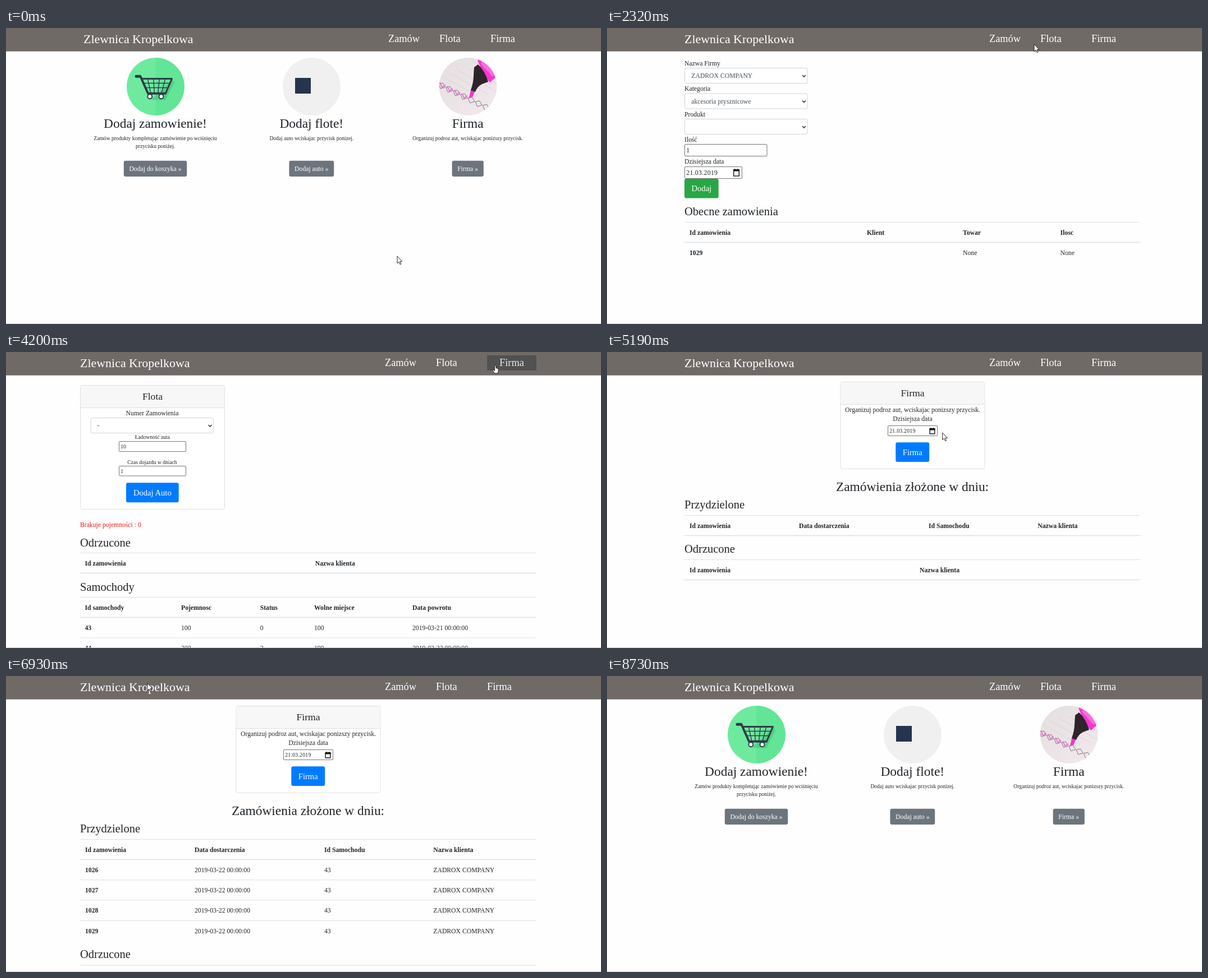
An HTML page that plays this animation: 1060x528 px, repeating every 9890 ms.

```html
<!DOCTYPE html>
<html lang="pl">
<head>
<meta charset="utf-8">
<title>Zlewnica Kropelkowa</title>
<style>
  html, body { margin: 0; width: 100%; height: 100%; overflow: hidden; background: #fefefe; }
  svg { display: block; width: 100%; height: 100%; }
  text { font-family: "Liberation Serif", "Times New Roman", serif; white-space: pre; }
</style>
</head>
<body>
<svg id="stage" viewBox="0 0 1060 528"></svg>
<script>
const LOOP = 9890;
const INK = '#212529', BODY = 11.7, SMALL = 9.55, H2 = 23.4, H3 = 20.5, LARGE = 14.6;
const BRAND = 'Zlewnica Kropelkowa', CLIENT = 'ZADROX COMPANY';

// Drawing helpers
const text = (x, y, s, size = BODY, extra = '', fill = INK) =>
  `<text x="${x}" y="${y}" font-size="${size}" fill="${fill}" ${extra}>${s}</text>`;
const mid = (x, y, s, size, fill) => text(x, y, s, size, 'text-anchor="middle"', fill);
const bold = (x, y, s) => text(x, y, s, BODY, 'font-weight="700"');
const box = (x, y, x2, y2, fill, extra = '') =>
  `<rect x="${x}" y="${y}" width="${x2 - x}" height="${y2 - y}" fill="${fill}" ${extra}/>`;
const path = (d, extra) => `<path d="${d}" ${extra}/>`;
const line = (d, width, color) =>
  path(d, `fill="none" stroke="${color}" stroke-width="${width}" stroke-linejoin="round" stroke-linecap="round"`);
const disc = (x, y, r, fill, extra = '') => `<circle cx="${x}" cy="${y}" r="${r}" fill="${fill}" ${extra}/>`;
const rule = (x, y, h = 1) => box(x, y, x + 812.5, y + h, '#dee2e6');
const group = (id, body, extra = '') => `<g id="${id}" ${extra}>${body}</g>`;
const frame = (x, y, x2, y2, stroke, r) =>
  box(x + .5, y + .5, x2 - .5, y2 - .5, '#fff', `stroke="${stroke}" rx="${r}"`);
const button = (x, y, x2, y2, fill, label, base, size, id = '') =>
  box(x, y, x2, y2, fill, `rx="3.2" ${id && `id="${id}"`}`) + mid((x + x2) / 2, base, label, size, '#fff');
const select = (x, y, value) => frame(x, y, x + 219.5, y + 28, '#ced4da', 3) +
  text(x + 12.3, y + 18, value, BODY, '', '#495057') +
  path(`M${x + 210} ${y + 13}l3 3l3 -3`, 'fill="none" stroke="#343a40" stroke-width="1.6"');
const input = (x, y, x2, y2, value, size = BODY, spacing = 0) => frame(x, y, x2, y2, '#767676', 1.5) +
  text(x + 3.2, y + (y2 - y) / 2 + size * .34, value, size, `letter-spacing="${spacing}"`);
const calendar = (x, y, w, h) => box(x + .7, y + 2, x + w - .7, y + h, 'none', 'stroke="#111" stroke-width="1.4"') +
  box(x, y + 1.3, x + w, y + 4.5, '#111') + box(x + 2, y, x + 3.4, y + 2, '#111') +
  box(x + w - 3.4, y, x + w - 2, y + 2, '#111');

function table(x, y, cols, head, rows) {
  let out = rule(x, y) + rule(x, y + 35.6, 1.6);
  cols.forEach((c, i) => out += bold(c, y + 22.5, head[i]));
  rows.forEach((row, r) => {
    const base = y + 58.8 + r * 36.3;
    if (r) out += rule(x, base - 22.8);
    row.forEach((cell, i) => out += (i ? text : bold)(cols[i], base, cell));
  });
  return out;
}

const card = (x, y, title, y2) => frame(x, y, x + 258, y2, '#dfdfdf', 3) +
  box(x + 1, y + 1, x + 257, y + 40, '#f7f7f7') + box(x, y + 40, x + 258, y + 41, '#dfdfdf') +
  mid(x + 129, y + 26, title, 17.6);

// Round pictures
function cart() {
  const dark = '#2f3b47';
  let grid = 'M245 98.5H291M249 106.5H288';
  for (let i = 1; i < 5; i++) grid += `M${242 + i * 10.4} 91L${251 + i * 6.6} 115`;
  const wheel = x => disc(x, 122.3, 4, '#fff', `stroke="${dark}" stroke-width="2"`);
  return disc(266.4, 104.5, 51.4, '#6eea9f') +
    path('M266.4 53.1a51.4 51.4 0 0 1 0 102.8z', 'fill="#62e596"') +
    path('M258 128L297 92L300 97L284 129Z', 'fill="#43bd78" opacity=".55"') +
    line(grid, 1.4, dark) + line('M242 90.5H295.5L284.5 116.5', 3, dark) +
    line('M232 86.3H239.5L253 116.8H284', 4, dark) + line('M232 86.3H238.5', 5, dark) +
    wheel(256.3) + wheel(276.5);
}

const fleet = () => disc(544.5, 104.5, 51.4, '#f0f0f0') + box(515, 89, 543, 117, '#26344f');

function marker() {
  let out = box(771, 53, 875, 156, 'url(#paper)');
  for (let i = 0; i < 7; i++) out += line(`M${755 + i * 17} ${88 - i * 4}l70 38`, .8, '#d9d0d3');
  for (let i = 0; i < 7; i++) {
    const x = 776 + i * 13.1, y = 103 + i * 6.4;
    out += line(`M${x - 5} ${y - 3.5}l7 -1.5l4.5 7.5l-8 2.5z`, 1, '#85757f');
    if (i < 4) out += line(`M${x - 3} ${y - 5}l4 8l5 -4`, 1.7, '#f268d6');
  }
  out += path('M840 57L849 51H876V85L862 97L851 85Z', 'fill="#fb35d2"') +
    path('M849 58L872 82L867 87L846 64Z', 'fill="#fd6cdf"') +
    path('M834 70L841 65Q853 76 859 96L848 100Q839 105 836 114L827.5 112Q833 97 833 85Z', 'fill="#2d2529"') +
    path('M828 111L835 113.5L831 123L825 124.5Z', 'fill="#f235c4"');
  return `<g clip-path="url(#round)">${out}</g>`;
}

// Pages
const grey = (x, x2, label, id) => button(x, 236.8, x2, 265, '#6c757d', label, 255, BODY, id);
const home = () => group('cart', cart()) + group('fleet', fleet()) +
  group('marker', marker(), 'clip-path="url(#load)"') +
  mid(266, 178, 'Dodaj zamowienie!', H2) + mid(544.3, 178, 'Dodaj flote!', H2) + mid(822.7, 178, 'Firma', H2) +
  mid(266, 200, 'Zamów produkty kompletując zamówienie po wciśnięciu', SMALL) +
  mid(266, 214, 'przycisku poniżej.', SMALL) +
  mid(544.3, 200, 'Dodaj auto wciskajac przycisk ponizej.', SMALL) +
  mid(822.7, 200, 'Organizuj podroz aut, wciskajac ponizszy przycisk.', SMALL) +
  box(208.7, 235.5, 323.5, 266.3, 'none', 'id="greyRing" rx="4.4" stroke="#b5babe" stroke-width="2.6"') +
  grey(209.8, 322.2, 'Dodaj do koszyka »', 'addOrder') + grey(504.4, 584.2, 'Dodaj auto »') +
  grey(794.6, 850.8, 'Firma »');

const orders = () => text(138, 66.5, 'Nazwa Firmy') + select(138, 71, CLIENT) +
  text(138, 112, 'Kategoria') + select(138, 116.5, 'akcesoria prysznicowe') +
  text(138, 157.5, 'Produkt') + select(138, 162, '') +
  text(138, 203, 'Ilość') + input(138, 207, 285.5, 229, '1') +
  text(138, 242, 'Dzisiejsza data') + input(138, 247, 241, 269, '21.03.2019', BODY, .35) + calendar(225, 251, 11, 13) +
  button(138, 269, 198.7, 303.5, '#28a745', 'Dodaj', 291, LARGE) +
  text(138, 334, 'Obecne zamowienia', H3) +
  table(138, 346, [147, 463, 634, 807.5], ['Id zamowienia', 'Klient', 'Towar', 'Ilosc'], [['1029', '', 'None', 'None']]);

const cars = () => card(132, 59, 'Flota', 281) +
  mid(260.5, 112.5, 'Numer Zamowienia', BODY) + select(150.5, 117, '-') +
  mid(260.8, 155, 'Ładowność auta', SMALL) + input(201, 159, 321, 178, '10', 9.75) +
  mid(260.5, 199.5, 'Czas dojazdu w dniach', SMALL) + input(201, 203, 321, 221.5, '1', 9.75) +
  button(214, 233.3, 307.7, 268.3, '#007bff', 'Dodaj Auto', 255.8, LARGE) +
  text(132, 311.7, 'Brakuje pojemności : 0', BODY, '', '#f01a10') +
  text(132, 346.5, 'Odrzucone', H3) +
  table(132, 358, [140.5, 550.7], ['Id zamowienia', 'Nazwa klienta'], []) +
  text(132, 425.5, 'Samochody', H3) +
  table(132, 437, [140.5, 312, 452.7, 549, 724],
    ['Id samochody', 'Pojemnosc', 'Status', 'Wolne miejsce', 'Data powrotu'],
    [['43', '100', '0', '100', '2019-03-21 00:00:00'], ['44', '200', '2', '199', '2019-03-23 00:00:00']]);

function company(rows, ring, send) {
  const dy = rows.length * 36.3;
  return card(415.5, 53, 'Firma', 209) +
    mid(544.5, 107, 'Organizuj podroz aut, wciskajac ponizszy przycisk.', BODY) +
    mid(544.5, 122.7, 'Dzisiejsza data', BODY) +
    input(500, 131, 589, 150, '21.03.2019', 9.75, .25) + calendar(574.5, 135, 10, 11) + ring +
    button(514.3, 161.2, 574.2, 196, '#007bff', 'Firma', 183.8, LARGE, send) +
    mid(544, 248, 'Zamówienia złożone w dniu:', H2) +
    text(138, 279, 'Przydzielone', H3) +
    table(138, 291, [147, 342, 573, 767.3], ['Id zamowienia', 'Data dostarczenia', 'Id Samochodu', 'Nazwa klienta'], rows) +
    text(138, 358 + dy, 'Odrzucone', H3) +
    table(138, 370 + dy, [147, 557], ['Id zamowienia', 'Nazwa klienta'], []);
}
const blueRing = box(513, 160, 575.5, 197, 'none', 'id="blueRing" rx="4.5" stroke="#80bdff" stroke-width="2.6"');
const assigned = [1026, 1027, 1028, 1029].map(n => [n, '2019-03-22 00:00:00', 43, CLIENT]);

const nav = () => text(138, 26.5, BRAND, 21.95, '', '#fff') + text(681, 25, 'Zamów', 18.35, '', '#fff') +
  ['Flota', 'Firma'].map(s => box(0, 6, 1, 33, '#515151', `id="bg${s}"`) +
    text(0, 25, s, 18.35, `id="tx${s}"`, '#fff')).join('');

const stage = document.getElementById('stage');
stage.innerHTML = `<defs>
  <linearGradient id="paper" x2="1" y2="1"><stop stop-color="#e3dfe0"/><stop offset="1" stop-color="#f3e9ec"/></linearGradient>
  <clipPath id="round"><circle cx="823" cy="104.5" r="51.4"/></clipPath>
  <clipPath id="load"><rect id="loaded" x="770" y="50" width="110" height="110"/></clipPath></defs>` +
  box(0, 0, 1060, 528, '#fefefe') + box(0, 0, 1060, 41.7, '#706a67') +
  group('nav', nav()) + group('home', home()) + group('orders', orders()) + group('cars', cars()) +
  group('company', company([], blueRing, 'send')) +
  group('tall', company(assigned, ''), 'transform="translate(-6)"') +
  box(0, 527, 1060, 528, '#c9c9c9') +
  group('cursor',
    path('M0 0V12.8L3 10.2L5 14.8L6.9 14L5 9.4H8.8Z', 'id="arrow"') +
    path('M-1.4 8V1Q-1.4 0 -.2 0Q1 0 1 1V4.6L4 5.2Q5.4 5.6 5.3 7L5 10.4L4.2 14H-1.6L-4.7 9.4Q-4.8 7.6 -3.3 8L-1.4 9.6Z', 'id="hand"'),
    'fill="#fff" stroke="#111" stroke-width=".9" stroke-linejoin="round"');

// Cursor legs: first step, last step, number of steps, target x, y, bend
const START = [697, 407];
const legs = [
  [70, 450, 6, 236, 228, -30], [520, 670, 3, 307, 250, 0],
  [1290, 1290, 1, 303, 254, 0],
  [1540, 2320, 11, 761, 29, 25], [2390, 2470, 2, 766, 30, 0],
  [2560, 2870, 5, 848, 27, 0], [3020, 3110, 2, 839, 45, 0],
  [3500, 3740, 4, 872, 25, 0], [4200, 4200, 1, 872, 24, 0], [4440, 4440, 1, 868, 24, 0],
  [4750, 5370, 9, 503, 160, 25], [5450, 5690, 4, 546, 178, 0],
  [5840, 6150, 5, 617, 187, 0], [6290, 6290, 1, 621, 187, 0],
  [6530, 6930, 6, 252, 13, 15], [7010, 7160, 3, 262, 20, 0],
  [8190, 8650, 7, 834, 454, -30]
];
const hands = [[520, 1290], [2560, 3110], [3580, 4440], [5450, 5920], [7010, 8190]];
const pages = [['home', 0], ['orders', 1290], ['cars', 3340], ['company', 4440], ['tall', 6290], ['home', 7310]];

function cursorAt(t) {
  let [x, y] = START;
  for (const [a, b, n, tx, ty, bend] of legs) {
    if (t < a) break;
    const step = n > 1 ? Math.min(n, 1 + Math.floor((t - a) / ((b - a) / (n - 1)))) : 1;
    const k = step / n, e = k * k * (3 - 2 * k);
    x += (tx - x) * e;
    y += (ty - y) * e + bend * 4 * e * (1 - e);
  }
  return [x, y];
}

const el = id => document.getElementById(id);
const set = (id, o) => { for (const k in o) el(id).setAttribute(k, o[k]); };
const show = (id, on) => el(id).style.display = on ? '' : 'none';
const ramp = (t, a, b) => Math.max(0, Math.min(1, (t - a) / (b - a)));
const within = (t, a, b) => t >= a && t < b;

function link(name, x, width, k) {
  const pad = 22 * k;
  set('tx' + name, { x: x + pad, 'fill-opacity': 1 - .14 * k });
  set('bg' + name, { x, width: width + 2 * pad, opacity: k });
}

function draw(time) {
  const t = time + 4;
  const page = pages.filter(p => t >= p[1]).pop()[0];
  ['home', 'orders', 'cars', 'company', 'tall'].forEach(p => show(p, p === page));
  set('nav', { transform: `translate(${page === 'cars' || page === 'tall' ? -6 : 0})` });
  link('Flota', 772, 38, ramp(t, 2480, 2720) - ramp(t, 2940, 3110));
  link('Firma', 863, 44, t < 4440 ? ramp(t, 3500, 3740) : 0);

  // Pictures arrive one after another when the start page returns
  show('fleet', !within(t, 7310, 7480));
  show('marker', !within(t, 7310, 7400));
  set('loaded', { height: within(t, 7310, 7480) ? 52 : 110 });

  set('addOrder', { fill: within(t, 520, 1290) ? '#5a6268' : '#6c757d' });
  show('greyRing', within(t, 970, 1290));
  set('send', { fill: within(t, 5450, 6290) ? '#0072f0' : '#007bff' });
  show('blueRing', within(t, 5610, 6290));

  const [x, y] = cursorAt(t), hand = hands.some(([a, b]) => within(t, a, b));
  set('cursor', { transform: `translate(${x.toFixed(1)} ${y.toFixed(1)})` });
  show('cursor', t < 8730);
  show('hand', hand);
  show('arrow', !hand);
}

const start = performance.now();
function tick() {
  draw((performance.now() - start) % LOOP);
  requestAnimationFrame(tick);
}
tick();
</script>
</body>
</html>
```
